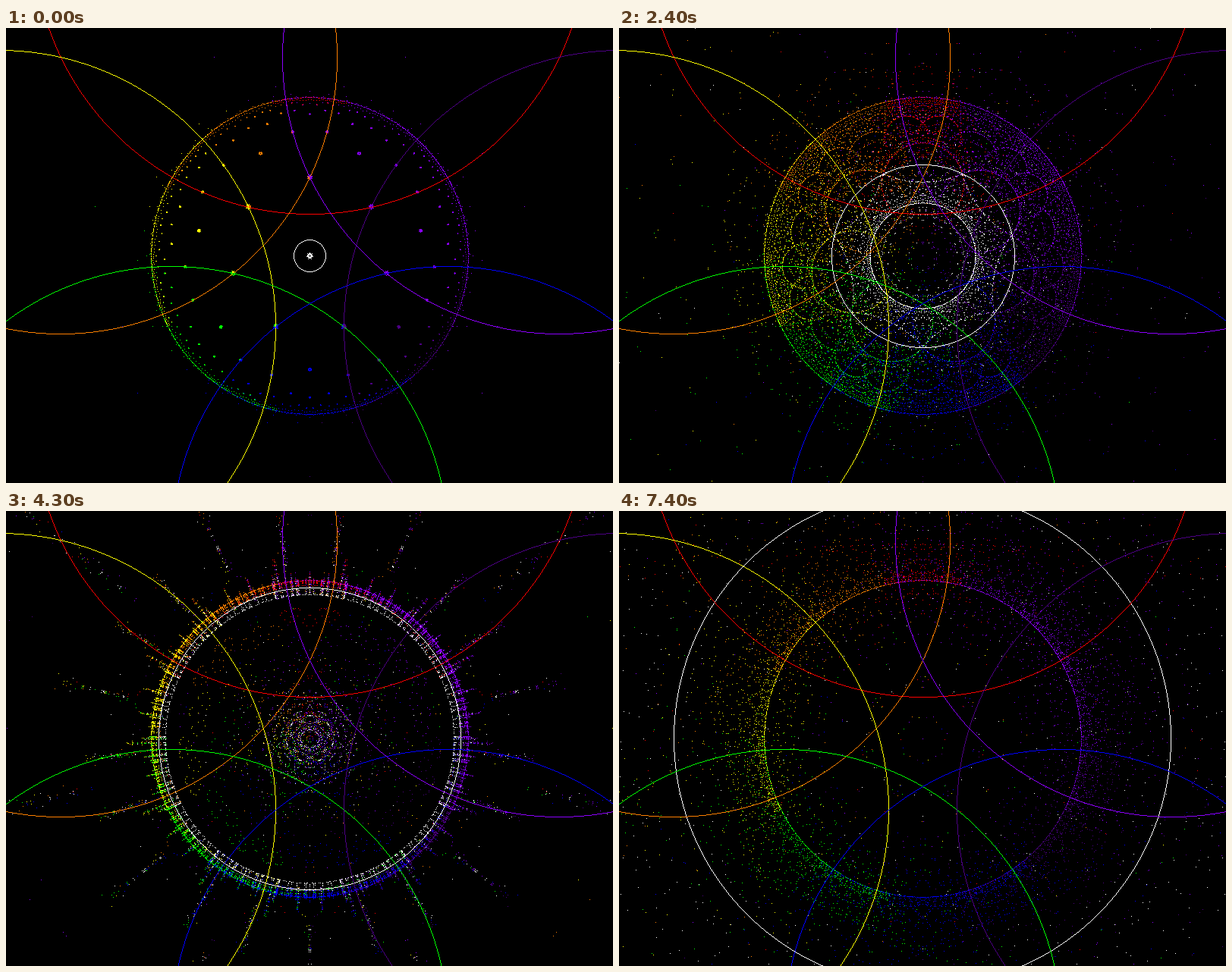
Recreate the animation shown at these times as an HTML page with a canvas. Size 800 by 600 pixels, loop 7.5 s.

```html
<!DOCTYPE html>
<html lang="en">
<head>
<meta charset="utf-8">
<title>Circle inversions</title>
<style>
html, body { margin: 0; width: 100%; height: 100%; overflow: hidden; background: #000; }
canvas { display: block; width: 800px; height: 600px; }
</style>
</head>
<body>
<canvas id="stage" width="800" height="600"></canvas>
<script>
const W = 800, H = 600, CX = 400, CY = 300;
const STEP = 100, COUNT = 75, DEPTH = 5;
const RING = 420;
const RADIUS = 2 * RING * Math.sin(Math.PI / 7);
const COLORS = [
  [255, 255, 255], [255, 0, 0], [255, 127, 0], [255, 255, 0],
  [0, 255, 0], [0, 0, 255], [75, 0, 130], [139, 0, 255]
];

const ctx = document.getElementById('stage').getContext('2d');
const image = ctx.createImageData(W, H);
const pixels = new Uint32Array(image.data.buffer);
const layer = new Uint8Array(W * H);
const palette = new Uint32Array(
  new Uint8Array([[0, 0, 0], ...COLORS].flatMap(c => [...c, 255])).buffer);

// A circle is kept as a unit vector (a, bx, by, c): centre b / a, radius 1 / |a|.
// Inversion is then a plain reflection, which also copes with straight lines.
function circle(x, y, r) {
  return { x, y, r, a: 1 / r, bx: x / r, by: y / r, c: (x * x + y * y - r * r) / r };
}

// Mirror 0 is the growing one in the middle; the other seven surround it.
const mirrors = COLORS.map((_, i) => {
  const angle = -Math.PI / 2 - (i - 1) * 2 * Math.PI / 7;
  return circle(RING * Math.cos(angle), RING * Math.sin(angle), RADIUS);
});

// Where centres coincide, the later colour wins.
function plot(x, y, tone) {
  const px = Math.round(x + CX), py = Math.round(y + CY);
  if (!(px >= 0 && py >= 0 && px < W && py < H)) return;
  const at = py * W + px;
  if (layer[at] < tone) layer[at] = tone;
}

// Marks the centre of a circle, then inverts it in every mirror not holding it.
function spread(a, bx, by, c, last, depth) {
  const x = bx / a, y = by / a, r = 1 / Math.abs(a);
  plot(x, y, last + 1);
  if (!depth) return;
  for (let i = 0; i < mirrors.length; i++) {
    if (i === last) continue;
    const m = mirrors[i];
    const dx = x - m.x, dy = y - m.y;
    if (Math.sqrt(dx * dx + dy * dy) + r < m.r) continue;
    const k = 2 * (bx * m.bx + by * m.by) - (a * m.c + c * m.a);
    spread(a - k * m.a, bx - k * m.bx, by - k * m.by, c - k * m.c, i, depth - 1);
  }
}

function dot(x, y, color) {
  if (x >= 0 && y >= 0 && x < W && y < H) pixels[y * W + x] = color;
}

// One-pixel circle inside a box with whole-number corner and size.
function outline(m, color) {
  const left = Math.round(CX + m.x - m.r), top = Math.round(CY + m.y - m.r);
  const size = Math.round(2 * m.r), r = size / 2;
  for (let u = (size % 2) / 2; u <= r * Math.SQRT1_2 + 0.5; u++) {
    const inset = Math.round(r - Math.sqrt(r * r - u * u));
    for (const along of [r - u, r + u]) {
      for (const across of [inset, size - inset]) {
        dot(left + along, top + across, color);
        dot(left + across, top + along, color);
      }
    }
  }
}

function draw(step) {
  mirrors[0] = circle(0, 0, 21 + 4.143 * step);
  layer.fill(0);
  mirrors.forEach((m, i) => spread(m.a, m.bx, m.by, m.c, i, DEPTH));
  for (let i = 0; i < pixels.length; i++) pixels[i] = palette[layer[i]];
  mirrors.forEach((m, i) => outline(m, palette[i + 1]));
  ctx.putImageData(image, 0, 0);
}

const start = performance.now();
let shown = -1;

function tick() {
  const time = Math.max(0, performance.now() - start);
  const step = Math.floor(time / STEP) % COUNT;
  if (step !== shown) {
    draw(step);
    shown = step;
  }
  requestAnimationFrame(tick);
}
tick();
</script>
</body>
</html>
```
